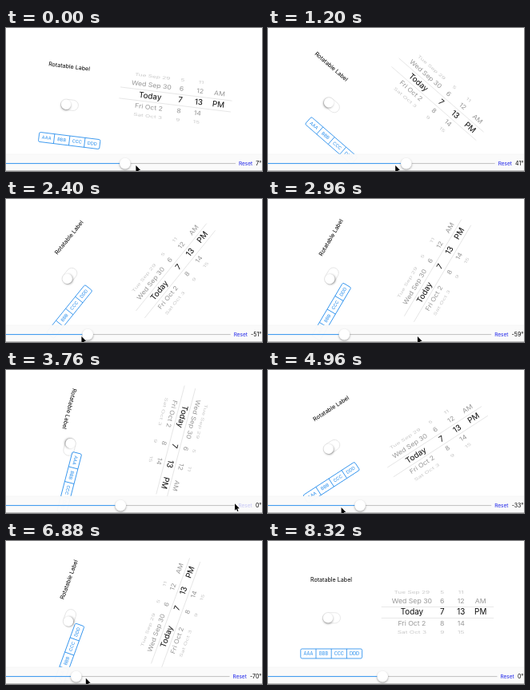
These frames come from a looping animation (320 by 179 pixels, 9.36 s). An HTML page with a canvas:

```html
<!DOCTYPE html>
<html lang="en">
<head>
<meta charset="utf-8">
<title>Rotatable controls</title>
<style>
html, body { margin: 0; width: 100%; height: 100%; overflow: hidden; background: #fff; }
canvas { display: block; width: 320px; height: 179px; }
</style>
</head>
<body>
<canvas id="stage"></canvas>
<script>
const LOOP = 9360, STEP = 80;
const BLUE = '#1c88ec';
const RESET_1 = 3690, RESET_2 = 7400, SPIN = 300;

const canvas = document.getElementById('stage');
const ctx = canvas.getContext('2d');
const dpr = window.devicePixelRatio || 1;
canvas.width = 320 * dpr;
canvas.height = 179 * dpr;

// Turning points of the rotation: time, degrees
const turns = [
  [-210, 0], [700, 56], [2900, -66], [3400, 120], [RESET_1, 120], [RESET_1 + SPIN, 0],
  [4720, 0], [5200, -66], [5560, -2], [6320, -70], [RESET_2, -70], [RESET_2 + SPIN, 0]
];

const mix = (a, b, u) => a + (b - a) * u;

function ease(t, from, to) {
  const u = Math.min(1, Math.max(0, (t - from) / (to - from)));
  return (1 - Math.cos(Math.PI * u)) / 2;
}

function degreesAt(t) {
  const i = turns.findIndex(turn => turn[0] > t);
  if (i < 0) return 0;
  const [t0, a] = turns[i - 1], [t1, b] = turns[i];
  return mix(a, b, ease(t, t0, t1));
}

function text(str, x, y, size, color, align = 'center') {
  ctx.font = `${size}px Inter, "Liberation Sans", sans-serif`;
  ctx.textAlign = align;
  ctx.textBaseline = 'middle';
  ctx.fillStyle = color;
  ctx.fillText(str, x, y);
}

function line(x1, y1, x2, y2, color, width) {
  ctx.strokeStyle = color;
  ctx.lineWidth = width;
  ctx.beginPath();
  ctx.moveTo(x1, y1);
  ctx.lineTo(x2, y2);
  ctx.stroke();
}

function box(w, h, r, color) {
  ctx.strokeStyle = color;
  ctx.lineWidth = .8;
  ctx.beginPath();
  ctx.roundRect(-w / 2, -h / 2, w, h, r);
  ctx.stroke();
}

function knob(x, y, r, angle = 0) {
  ctx.save();
  ctx.shadowColor = 'rgba(0,0,0,.38)';
  ctx.shadowBlur = 2.5 * dpr;
  ctx.shadowOffsetX = -Math.sin(angle) * 1.2 * dpr;
  ctx.shadowOffsetY = Math.cos(angle) * 1.2 * dpr;
  ctx.fillStyle = '#fff';
  ctx.beginPath();
  ctx.arc(x, y, r, 0, 2 * Math.PI);
  ctx.fill();
  ctx.restore();
}

function rotated(x, y, angle, paint) {
  ctx.save();
  ctx.translate(x, y);
  ctx.rotate(angle);
  paint(angle);
  ctx.restore();
}

function label() {
  text('Rotatable Label', 0, 0, 7.15, '#000');
}

function toggle(angle) {
  box(22, 13.2, 6.6, '#e2e2e2');
  knob(-4.5, 0, 6.2, angle);
}

function segments() {
  const w = 19.2;
  box(4 * w, 12, 1.8, BLUE);
  [...'ABCD'].forEach((c, i) => {
    text(c.repeat(3), (i - 1.5) * w, .2, 5.6, BLUE);
    if (i) line((i - 2) * w, -6, (i - 2) * w, 6, BLUE, .8);
  });
}

// Five rows on a wheel, the selected one in front
function picker() {
  const days = ['Tue Sep 29', 'Wed Sep 30', 'Today', 'Fri Oct 2', 'Sat Oct 3'];
  for (const y of [-7, 7]) line(-70.5, y, 70, y, '#d8d8d8', .6);
  days.forEach((day, row) => {
    const i = row - 2, far = Math.abs(i), tilt = i * .46;
    const size = far ? 9.1 - .4 * far : 9.85;
    const gray = far ? 100 + 50 * far : 10;
    const put = (str, x) => text(str, x, 0, size, `rgb(${gray},${gray},${gray})`);
    ctx.save();
    ctx.translate(0, 31.4 * Math.sin(tilt));
    ctx.scale(1, Math.cos(tilt));
    put(day, -32.3);
    put(7 + i, 5.6);
    put(13 + i, 29);
    if (i === -1) put('AM', 53.5);
    if (i === 0) put('PM', 53.5);
    ctx.restore();
  });
}

// The button dims while pressed and fades back after release
function resetAlpha(t) {
  const release = t < 5000 ? RESET_1 : RESET_2;
  return t < release - 90 ? 1 : mix(.2, 1, ease(t, release, release + 520));
}

function toolbar(value, alpha) {
  ctx.fillStyle = 'rgba(250,250,250,.97)';
  ctx.fillRect(0, 158, 320, 21);
  line(0, 158, 320, 158, '#ececec', .5);
  line(0, 178.5, 320, 178.5, '#bdbdbd', 1);

  const y = 169.6;
  const degrees = Math.round(value) + '°';
  text(degrees, 319.5, y, 7, '#000', 'right');
  const right = 319.5 - ctx.measureText(degrees).width - 4.2;
  ctx.globalAlpha = alpha;
  text('Reset', right, y, 6.5, '#1c22ea', 'right');
  const end = right - ctx.measureText('Reset').width - 4;
  ctx.globalAlpha = 1;

  const x = end / 2 + value * (end / 2 - 6) / 180;
  line(x, y, end, y, '#b9b9b9', .9);
  line(0, y, x, y, BLUE, .9);
  knob(x, y, 6.8);
}

// The pointer leads the knob, and travels to the button for each reset
function cursor(t) {
  const back = ease(t, RESET_1 + 150, RESET_1 + 750);
  const visit = ease(t, RESET_1 - 600, RESET_1 - 80) * (1 - back)
    + ease(t, RESET_2 - 600, RESET_2 - 80);
  ctx.save();
  ctx.translate(mix(141 + .75 * degreesAt(t + 250), 286, visit), mix(172, 167.3, visit));
  ctx.beginPath();
  [[0, 0], [0, 8.4], [1.9, 6.7], [3.2, 9.8], [4.5, 9.2], [3.2, 6.2], [5.8, 6]]
    .forEach(p => ctx.lineTo(...p));
  ctx.closePath();
  ctx.strokeStyle = '#fff';
  ctx.stroke();
  ctx.fillStyle = '#000';
  ctx.fill();
  ctx.restore();
}

function draw(t) {
  const degrees = degreesAt(t);
  const angle = degrees * Math.PI / 180;
  const cleared = t >= RESET_2 || (t >= RESET_1 && t < RESET_1 + SPIN);

  ctx.setTransform(dpr, 0, 0, dpr, 0, 0);
  ctx.fillStyle = '#fff';
  ctx.fillRect(0, 0, 320, 179);

  rotated(79, 48.4, angle, label);
  rotated(79.5, 96.3, angle, toggle);
  rotated(79.2, 141, angle, segments);
  rotated(212.2, 89.5, angle, picker);
  toolbar(cleared ? 0 : degrees, resetAlpha(t));
  if (t < 8240) cursor(t);
}

const start = performance.now();
function tick() {
  const t = (performance.now() - start) % LOOP;
  draw(Math.floor(t / STEP) * STEP);
  requestAnimationFrame(tick);
}
tick();
</script>
</body>
</html>
```
